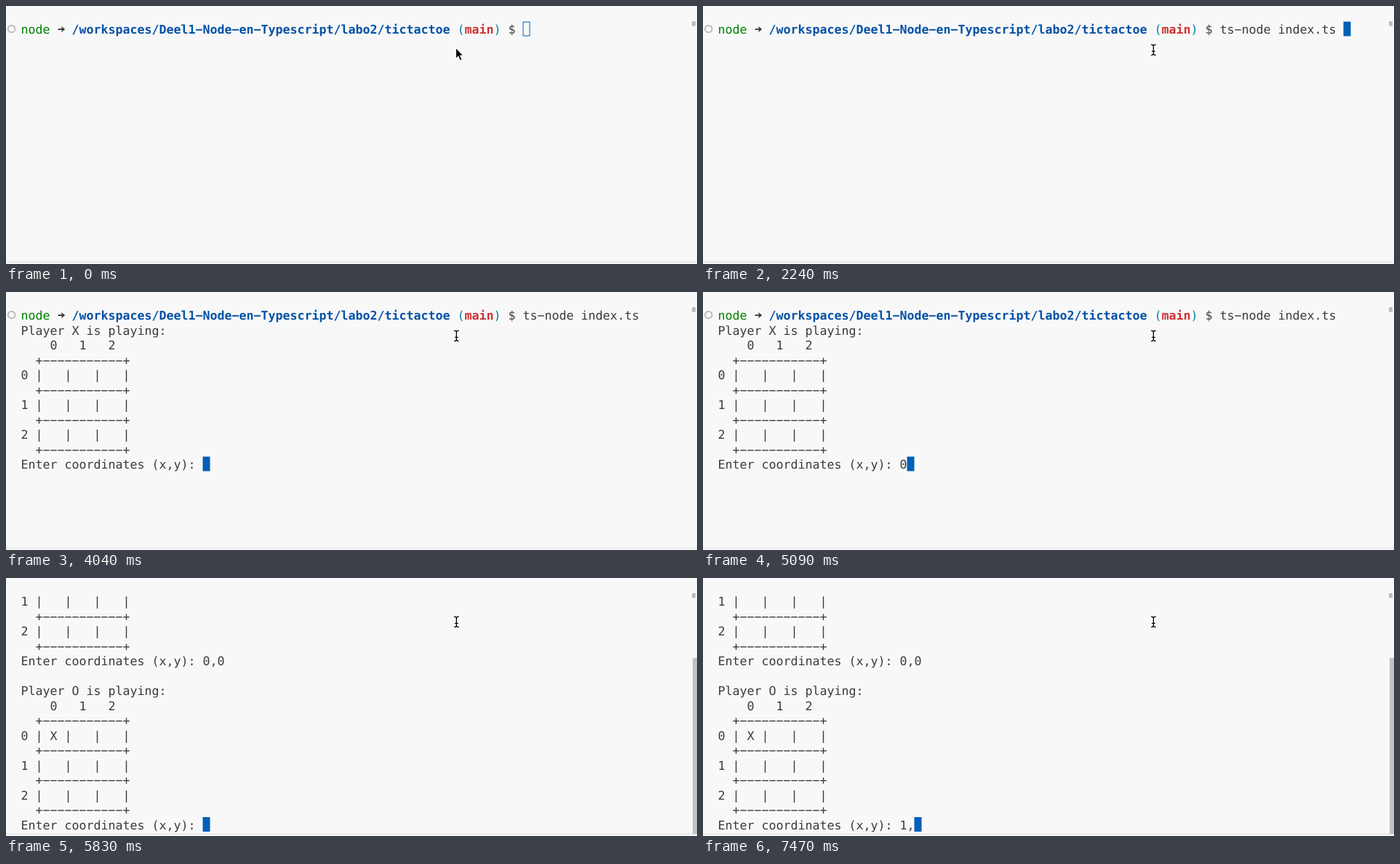
An HTML page that plays this animation: 950 px wide and 355 px high, repeating every 8 s.

```html
<!DOCTYPE html>
<html lang="en">
<head>
<meta charset="utf-8">
<title>Terminal tic-tac-toe</title>
<style>
  html, body { margin: 0; width: 100%; height: 100%; overflow: hidden; background: #f8f8f8; }
  svg { display: block; width: 100%; height: 100%; }
  text {
    font: 16.61px "DejaVu Sans Mono", monospace;
    text-rendering: geometricPrecision;
    white-space: pre;
    fill: #3b3b3b;
  }
  .bold { font-weight: bold; }
  .green { fill: #008000; }
  .blue { fill: #0451a5; }
  .cyan { fill: #0482a1; }
  .red { fill: #cd3131; }
</style>
</head>
<body>
<svg viewBox="0 0 950 355">
  <rect width="950" height="355" fill="#f8f8f8"/>
  <rect y="351.5" width="950" height="1.6" fill="#e4e4e4"/>
  <rect x="943" y="21" width="5" height="6.5" fill="#bdbdbd"/>
  <rect id="slider" x="944" y="110" width="6" height="242" fill="#c1c1c1"/>

  <g id="prompt">
    <circle cx="7.6" cy="31.5" r="4.8" fill="none" stroke="#b9b9b9" stroke-width="1.9"/>
    <path d="M71.5 32H78" stroke="#3b3b3b" stroke-width="1.9"/>
    <path d="M76 27.8L81.2 32L76 36.2L77.2 32Z" fill="#3b3b3b"/>
    <g id="promptText"></g>
  </g>
  <g id="lines"></g>
  <rect id="cursor" stroke="#005fb8"/>

  <path id="arrow" d="M618.4 57.4V72.6L621.8 69.4L624.2 75L626.9 73.9L624.5 68.4H629Z"
        fill="#000" stroke="#fff" stroke-width="1.1"/>
  <g id="beam" fill="none" stroke-linecap="round">
    <path id="beamShape" d="M616.4 53.2Q619.3 53.2 619.3 55.6Q619.3 53.2 622.2 53.2M619.3 55.4V65.4M616.4 67.6Q619.3 67.6 619.3 65.2Q619.3 67.6 622.2 67.6M617.4 62.4H621.2"
          stroke="#fff" stroke-width="2.8"/>
    <use href="#beamShape"/>
    <path id="beamInk" stroke="#000" stroke-width="1.3"/>
  </g>
</svg>
<script>
const LOOP = 8000;
const LEFT = 20.5, TOP = 21, BASE = 38, COL = 10, ROW = 20.5;
const NS = "http://www.w3.org/2000/svg";
const $ = id => document.getElementById(id);

// The minus glyph gives the wide hyphen of the terminal font.
const wide = s => s.replace(/-/g, "\u2212");

function addText(parent, col, row, str, cls = "") {
  const el = document.createElementNS(NS, "text");
  el.setAttribute("x", LEFT + col * COL);
  el.setAttribute("y", BASE + row * ROW);
  el.setAttribute("class", cls);
  el.textContent = wide(str);
  parent.append(el);
}

const PROMPT = [
  [0, "node", "green"],
  [7, "/workspaces/Deel1-Node-en-Typescript/labo2/tictactoe", "bold blue"],
  [60, "(", "cyan"],
  [61, "main", "bold red"],
  [65, ")", "cyan"],
  [67, "$"]
];
const PROMPT_COLS = 69;
PROMPT.forEach(([col, str, cls]) => addText($("promptText"), col, 0, str, cls));
$("beamInk").setAttribute("d", $("beamShape").getAttribute("d"));

const ASK = "Enter coordinates (x,y): ";
const RULE = "  +" + "-".repeat(11) + "+";

function board(player, first = " ") {
  const out = [`Player ${player} is playing:`, "    0   1   2", RULE];
  for (let r = 0; r < 3; r++) {
    out.push(`${r} | ${r ? " " : first} |   |   |`, RULE);
  }
  return out;
}

const RUN = "ts-node index.ts ";
const turnX = input => [RUN, ...board("X"), ASK + input];
const turnO = input => [...board("X").slice(5), ASK + "0,0", "", ...board("O", "X"), ASK + input];

// Start time, visible lines, whether the prompt has scrolled away.
const SCREENS = [
  [0, [""]],
  [1490, ["clear"]],
  [2240, [RUN]],
  [2840, [RUN, ""]],
  [4040, turnX("")],
  [5090, turnX("0")],
  [5390, turnX("0,")],
  [5530, turnX("0,0")],
  [5830, turnO(""), true],
  [7320, turnO("1"), true],
  [7470, turnO("1,"), true]
];
const HOVER = 320, FOCUS = 440;

const show = (id, on) => $(id).setAttribute("visibility", on ? "visible" : "hidden");

function drawScreen(lines, scrolled) {
  const indent = row => row === 0 && !scrolled ? PROMPT_COLS : 0;
  $("lines").replaceChildren();
  lines.forEach((str, row) => addText($("lines"), indent(row), row, str));
  show("prompt", !scrolled);
  show("slider", scrolled);

  const row = lines.length - 1;
  const x = LEFT + (indent(row) + lines[row].length) * COL;
  const box = { x: x + 0.5, y: TOP + row * ROW + 1, width: 9, height: 19 };
  for (const key in box) $("cursor").setAttribute(key, box[key]);
}

let current = null;
function render(t) {
  const screen = SCREENS.findLast(s => s[0] <= t);
  if (screen !== current) {
    current = screen;
    drawScreen(screen[1], !!screen[2]);
  }
  $("cursor").setAttribute("fill", t < FOCUS ? "none" : "#005fb8");
  show("arrow", t < HOVER);
  show("beam", t >= HOVER);
}

const start = performance.now();
function tick() {
  render((performance.now() - start) % LOOP);
  requestAnimationFrame(tick);
}
tick();
</script>
</body>
</html>
```
